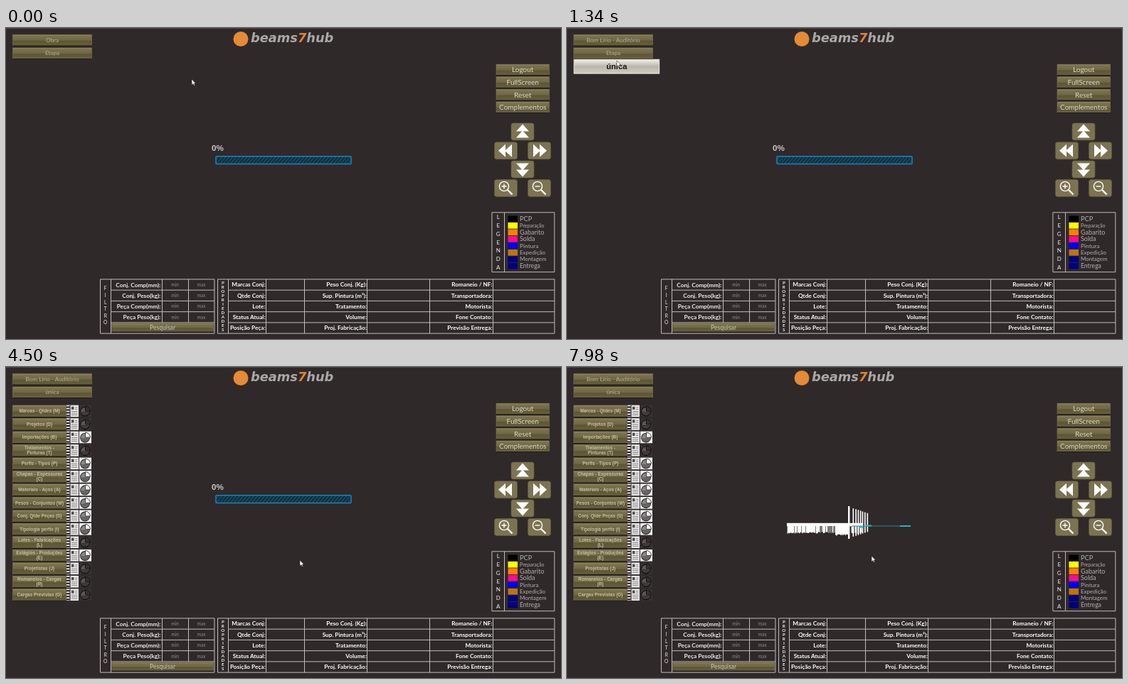
Animation, 780 px wide and 438 px high, one loop 8000 ms. Source, as an HTML page:

```html
<!DOCTYPE html>
<html lang="pt">
<head>
<meta charset="utf-8">
<style>
  html, body { margin: 0; width: 100%; height: 100%; overflow: hidden; background: #30292a; }
  svg { display: block; width: 780px; height: 438px; font-family: Lato, sans-serif; }
  .arial { font-family: "Liberation Sans", Arial, sans-serif; font-weight: 700; }
  .bold { font-weight: 700; }
  .grid { fill: none; stroke: #bfbcbc; stroke-width: 1; }
</style>
</head>
<body>
<svg id="stage" viewBox="0 0 780 438">
  <defs>
    <linearGradient id="olive" x2="0" y2="1">
      <stop offset="0" stop-color="#918966"/><stop offset=".15" stop-color="#79714b"/>
      <stop offset=".5" stop-color="#716943"/><stop offset=".58" stop-color="#5d5635"/>
      <stop offset="1" stop-color="#675f3c"/>
    </linearGradient>
    <linearGradient id="light" x2="0" y2="1">
      <stop offset="0" stop-color="#f2f0ea"/><stop offset=".5" stop-color="#b9b5aa"/>
      <stop offset="1" stop-color="#cfccc2"/>
    </linearGradient>
    <pattern id="idle" width="5" height="12" patternUnits="userSpaceOnUse" patternTransform="skewX(-40)">
      <rect width="5" height="12" fill="#10303e"/><rect width="2" height="12" fill="#1a4b5e"/>
    </pattern>
    <pattern id="full" width="6" height="12" patternUnits="userSpaceOnUse" patternTransform="skewX(-40)">
      <rect width="6" height="12" fill="#dcb964"/><rect width="2" height="12" fill="#a58238"/>
    </pattern>
  </defs>
</svg>
<script>
const LOOP = 8000, PROJECT = 'Bom Lírio - Auditório';
const stage = document.getElementById('stage');

const rect = (x, y, w, h, fill, more = '') =>
  `<rect x="${x}" y="${y}" width="${w}" height="${h}" fill="${fill}" ${more}/>`;
const path = (d, more) => `<path d="${d}" ${more}/>`;
// Text whose capitals are centred on y
const text = (x, y, s, size, fill = '#fff', anchor = 'middle', more = '') =>
  `<text x="${x}" y="${y + size * .36}" font-size="${size}" fill="${fill}" text-anchor="${anchor}" ${more}>${s}</text>`;
const button = (x, y, w, h, s, size, fill, more) =>
  rect(x, y, w, h, 'url(#olive)', 'stroke="#7d7552" stroke-width=".6"') +
  path(`M${x} ${y + h + .5}h${w}`, 'stroke="#1d1817"') +
  text(x + w / 2, y + h / 2, s, size, fill, 'middle', more);
const group = (id, body) => `<g id="${id}">${body}</g>`;
const column = (x, y, step, word, size, more) =>
  [...word].map((c, i) => text(x, y + i * step, c, size, '#eee', 'middle', more)).join('');

function header() {
  return rect(0, 0, 780, 1, '#4d4647') +
    '<circle cx="330" cy="15.5" r="10.5" fill="#e58a35"/>' +
    `<text x="344" y="20" font-size="17.8" fill="#aaa8a8" font-weight="700" font-style="italic"
      font-family="DejaVu Sans, sans-serif">beams<tspan fill="#e0832f">7</tspan>hub</text>`;
}

function controls() {
  let out = ['Logout', 'FullScreen', 'Reset', 'Complementos'].map((s, i) =>
    button(689, 51.2 + i * 17.6, 74.5, 15, s, 10, '#dedacb')).join('');
  const pads = [[726, 146], [702.5, 172.8], [749.5, 172.8], [726, 199], [702.5, 225.5], [749.5, 225.5]];
  out += pads.map(([x, y]) =>
    rect(x - 16, y - 12, 32, 24, '#7c7350', 'rx="3" stroke="#655d40" stroke-width=".6"')).join('');
  const turns = [0, -90, 90, 180];
  out += turns.map((a, i) => path('M0-10.5L9-.5H-9ZM0-1.5L9 8.5H-9Z',
    `fill="#fff" transform="translate(${pads[i]}) rotate(${a})"`)).join('');
  for (const [i, sign] of [[4, 'M-6-2.5h7M-2.5-6v7'], [5, 'M-6-2.5h7']]) {
    out += `<g transform="translate(${pads[i]})" fill="none" stroke="#fff" stroke-width="1.4">
      <circle cx="-2.5" cy="-2.5" r="6.6"/>${path(sign, '')}${path('M2.5 2.5L9 9', 'stroke-width="2.4"')}</g>`;
  }
  return out;
}

function legend() {
  const items = [['PCP', '#000', 9.2], ['Preparação', '#ff0', 7], ['Gabarito', '#ff8000', 9],
    ['Solda', '#ff0a8c', 9], ['Pintura', '#00f', 8.4], ['Expedição', '#c07508', 8],
    ['Montagem', '#000080', 7.9], ['Entrega', '#000080', 8.6]];
  return path('M682.9 259.8H770.8V343.7H682.9ZM700.5 259.8V343.7', 'class="grid"') +
    column(691.7, 266.5, 11.75, 'LEGENDA', 8) +
    group('legend', items.map(([s, c, size], i) =>
      rect(705.5, 264.5 + i * 9.5, 13.5, 8.6, c) +
      text(722, 268.5 + i * 9.5, s, size, '#b3b0b0', 'start')).join(''));
}

function tables() {
  const line = i => 353.9 + i * 15.25, row = i => line(i + .5);
  const box = (x, w) => path(`M${x} ${line(0)}h${w}V${line(5)}h${-w}Z`, 'class="grid"');
  const across = (x, w) => path([1, 2, 3, 4].map(i => `M${x} ${line(i)}h${w}`).join(''), 'class="grid"');
  const down = (xs, last = 5) => path(xs.map(x => `M${x} ${line(0)}V${line(last)}`).join(''), 'class="grid"');

  let out = box(132.5, 160.4) + across(147.5, 145.4) + down([147.5]) + down([219.5, 256.5], 4);
  out += column(139.7, 367, 9.6, 'FILTRO', 6.6);
  ['Conj. Comp(mm):', 'Conj. Peso(kg):', 'Peça Comp(mm):', 'Peça Peso(kg):'].forEach((s, i) => {
    out += text(217.5, row(i), s, 8.3, '#f0eeee', 'end', 'class="bold"') +
      text(237.5, row(i), 'min', 6.6, '#8f8a8a') + text(274.5, row(i), 'max', 6.6, '#8f8a8a');
  });
  out += button(148.8, 416, 142.5, 11.6, 'Pesquisar', 8.6, '#cfc9ae');

  out += box(297.5, 473.4) + across(312.5, 458.4) + down([312.5, 365.5, 419.5, 507.5, 595.5, 684.5]);
  out += column(304.8, 358.5, 6.05, 'PROPRIEDADES', 6.2, 'class="bold"');
  const fields = [
    [364.5, 'Marcas Conj:', 'Qtde Conj:', 'Lote:', 'Status Atual:', 'Posição Peça:'],
    [507, 'Peso Conj. (Kg):', 'Sup. Pintura (m²):', 'Tratamento:', 'Volume:', 'Proj. Fabricação:'],
    [683.5, 'Romaneio / NF:', 'Transportadora:', 'Motorista:', 'Fone Contato:', 'Previsão Entrega:']];
  for (const [x, ...names] of fields)
    names.forEach((s, i) => { out += text(x, row(i), s, 8.2, '#fff', 'end', 'class="bold"'); });
  return out;
}

// Ring binder page, then a striped pie with one slice lifted
function icons(y, dark) {
  const [back, ink, fill] = dark ? ['#363031', '#151112', '#5b5657'] : ['#f2f2f2', '#343031', '#8b8788'];
  return rect(85, y - .3, 17, 16.6, '#e9e8e8') +
    path(`M85 ${y + 2.5}h4.5m-4.5 4h4.5m-4.5 4h4.5m-4.5 4h4.5`, 'stroke="#1b1718" stroke-width="2"') +
    path(`M90 ${y}V${y + 16}`, 'stroke="#2a2526" stroke-width="1.2"') +
    rect(92, y + 1.8, 3.5, 4.2, '#5a4a4a') +
    path(`M97 ${y + 3}h3.5m-3.5 2.5h3.5M92 ${y + 8.5}h8.5m-8.5 2.5h8.5m-8.5 2.5h8.5`, 'stroke="#858182"') +
    rect(103, y - .3, 17, 16.6, back) +
    `<circle cx="111" cy="${y + 8.7}" r="6.4" fill="${fill}" stroke="${ink}" stroke-width="1.2"/>` +
    path(`M106 ${y + 10}h10m-9.5 2h9m-7.5 2h6`, `stroke="${ink}" stroke-width=".8"`) +
    path(`M111.5 ${y + 8.2}V${y + 1.2}A7 7 0 0 1 118.5 ${y + 8.2}Z`,
      `fill="${back}" stroke="${ink}" stroke-width=".9"`);
}

function menu() {
  const names = ['Marcas - Qtdes (M)', 'Projetos (D)', 'Importações (B)', 'Tratamentos -|Pinturas (T)',
    'Perfis - Tipos (P)', 'Chapas - Espessuras|(C)', 'Materiais - Aços (A)', 'Pesos - Conjuntos (W)',
    'Conj. Qtde Peças (S)', 'Tipologia perfis (I)', 'Lotes - Fabricações|(L)',
    'Estágios - Produções|(E)', 'Projetistas (J)', 'Romaneios - Cargas|(R)', 'Cargas Previstas (G)'];
  const dark = [0, 1, 3, 10, 12, 13, 14];
  return names.map((s, i) => {
    const y = 54 + i * 18.48, parts = s.split('|');
    return button(9.5, y, 75, 16, '', 6) +
      parts.map((p, k) => text(47, y + 8 + (k - (parts.length - 1) / 2) * 7.2, p, 6.4,
        '#c6c0a4', 'middle', 'class="arial"')).join('') +
      icons(y, dark.includes(i));
  }).join('');
}

function model() {
  let seed = 7, out = rect(309, 219.8, 106, 4.6, '#fff');
  const rand = () => (seed = seed * 16807 % 2147483647) / 2147483647;
  // Hanging fringe: start, end, bottom, share of white strands
  for (const [from, to, bottom, white] of [[309, 324, 235, .8], [324, 352, 234.5, .85],
    [352, 377, 234, .3], [377, 397, 237.5, 1], [399, 416, 235, .2]]) {
    for (let x = from; x < to; x++)
      out += rect(x, 224, 1, bottom - 224 - rand() * 2, rand() < white ? '#fff' : '#7d797a');
  }
  [395, 401.5, 405.3, 408.6, 411.8, 414.7, 418, 421.5].forEach((x, i) => {
    const inset = (i && 2) + i * 1.1;
    out += rect(x, 196 + inset, i ? 1.6 : 2.4, 46 - 2 * inset, '#fff');
  });
  return out + path('M400 224H483', 'stroke="#168b9d" stroke-width="1.2"') +
    path('M411 225.5h6m3-2h8m40 .5h15', 'stroke="#21b5cb" stroke-width="1.8"');
}

const drop = (id, y, s) => group(id,
  rect(10, y, 119.5, 19.5, 'url(#light)', 'stroke="#dedbd2" stroke-width="1.4"') +
  text(69.8, y + 9.6, s, 11.2, '#181414', 'middle', 'class="arial"'));

stage.innerHTML += header() +
  button(9.5, 9.5, 111, 15, 'Obra', 8.2, '#b9b294', 'id="work"') +
  button(9.5, 28, 111, 15, 'Etapa', 8.2, '#b9b294', 'id="phase"') +
  group('menu', menu()) + controls() + legend() + tables() +
  group('bar', rect(295, 180.7, 190, 10.8, 'url(#idle)', 'id="fill" rx="1" stroke="#1b82bd" stroke-width="1.5"') +
    text(289, 169.2, '0%', 11.6, '#cbc9c9', 'start', 'id="percent" class="arial"')) +
  group('model', model()) + drop('works', 25.8, PROJECT) + drop('phases', 44.5, 'única') +
  path('M0 0V8.2L2 6.5 3.2 9.2 4.5 8.6 3.4 6H5.6Z', 'id="cursor" fill="#fff" stroke="#111" stroke-width=".5"');

const el = Object.fromEntries([...stage.querySelectorAll('[id]')].map(e => [e.id, e]));
const show = (id, on) => { el[id].style.display = on ? '' : 'none'; };

// Cursor stops: time, x, y
const stops = [[0, 261, 72], [320, 261, 72], [780, 66, 17], [900, 66, 17], [1000, 64, 35], [1160, 64, 35],
  [1280, 68, 36], [1400, 72, 55], [1970, 72, 55], [2150, 477, 179], [2430, 477, 179], [2470, 531, 320],
  [2510, 504, 397], [3420, 504, 397], [3440, 504, 411], [3460, 481, 372], [3620, 458, 255],
  [3860, 458, 255], [4210, 437, 264], [4360, 437, 264], [4620, 393, 278], [4900, 412, 279],
  [5140, 412, 279], [5400, 414, 276], [6740, 414, 276], [6880, 417, 277], [7500, 417, 277],
  [7980, 428, 266], [LOOP, 428, 266]];

function cursorAt(t) {
  const i = stops.findIndex(s => s[0] > t), [t0, x0, y0] = stops[i - 1], [t1, x1, y1] = stops[i];
  const k = (t - t0) / (t1 - t0);
  return [Math.round(x0 + (x1 - x0) * k), Math.round(y0 + (y1 - y0) * k)];
}

function draw(now) {
  const t = now % LOOP, within = (a, b) => t >= a && t < b;
  const done = within(5400, 5620) || within(5880, 6230);
  el.work.textContent = t < 1080 ? 'Obra' : PROJECT;
  el.phase.textContent = t < 1500 ? 'Etapa' : 'única';
  show('works', within(860, 1080));
  show('phases', within(1260, 1500));
  show('legend', !within(1500, 1880));
  show('menu', t >= 3450);
  show('bar', t < 7600);
  show('model', t >= 7600);
  el.fill.setAttribute('fill', done ? 'url(#full)' : 'url(#idle)');
  el.percent.textContent = done ? '100%' : '0%';
  el.percent.setAttribute('x', done ? 468.3 : 289);
  el.cursor.setAttribute('transform', `translate(${cursorAt(t)})`);
  requestAnimationFrame(draw);
}
draw(performance.now());
</script>
</body>
</html>
```
